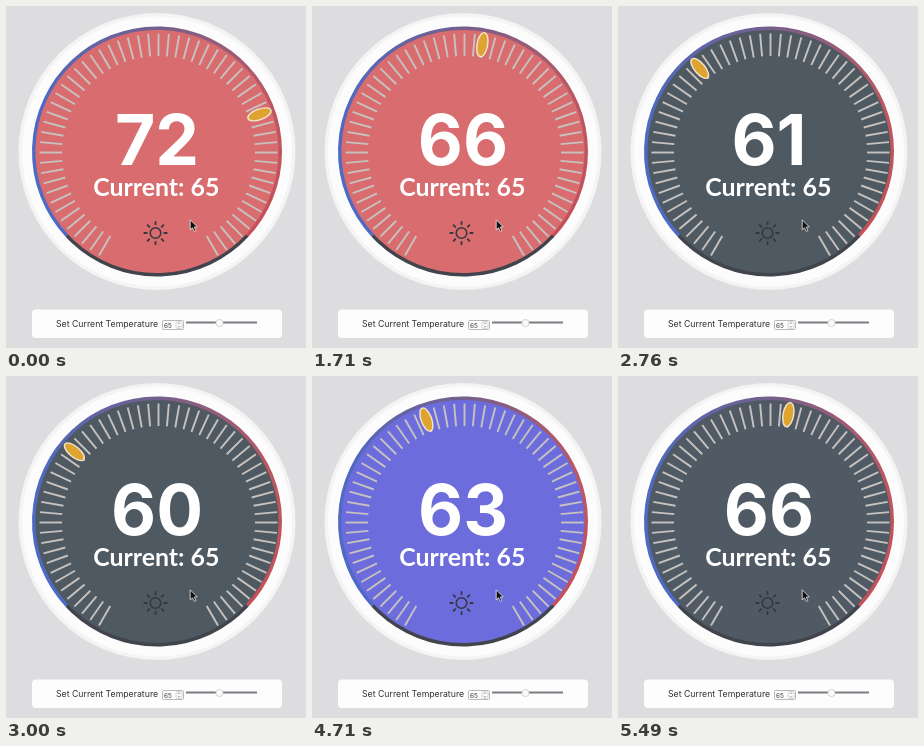
Recreate the animation shown at these times as an HTML page with a canvas. Size 300x342 px, loop 5520 ms.

```html
<!DOCTYPE html>
<html lang="en">
<head>
<meta charset="utf-8">
<title>Thermostat</title>
<style>
html, body { margin: 0; width: 100%; height: 100%; overflow: hidden; background: #dddddf; }
canvas { display: block; width: 300px; height: 342px; }
</style>
</head>
<body>
<canvas id="stage"></canvas>
<script>
const LOOP = 5520, CX = 151, CY = 145.5;
const canvas = document.getElementById('stage');
const ctx = canvas.getContext('2d');
const scale = window.devicePixelRatio || 1;
canvas.width = 300 * scale;
canvas.height = 342 * scale;

const RED = [217, 108, 111], SLATE = [79, 89, 97], BLUE = [108, 108, 220];
const FADE = 350;
// time, handle angle in degrees from the top
const path = [[0, 70], [300, 70], [1110, 40], [1980, -5], [2760, -40], [3300, -60],
  [3420, -60], [3630, -55], [4710, -20], [5490, 10], [5520, 10]];
const fades = [[1840, SLATE], [3000, BLUE], [5220, SLATE]];
const rad = deg => deg * Math.PI / 180;

function angleAt(t) {
  let i = 1;
  while (i < path.length - 1 && t > path[i][0]) i++;
  const [t0, a0] = path[i - 1], [t1, a1] = path[i];
  return Math.round((a0 + (a1 - a0) * (t - t0) / (t1 - t0)) / 5) * 5;
}

// cubic-bezier(.25, .1, .25, 1)
function ease(x) {
  if (x <= 0 || x >= 1) return x <= 0 ? 0 : 1;
  let lo = 0, hi = 1, u = 0.5;
  for (let i = 0; i < 20; i++) {
    u = (lo + hi) / 2;
    const bx = 0.75 * u * (1 - u) + u ** 3;
    if (bx < x) lo = u; else hi = u;
  }
  return 0.3 * u * (1 - u) ** 2 + 3 * u * u * (1 - u) + u ** 3;
}

function faceColor(t) {
  let c = RED;
  for (const [start, to] of fades) {
    const k = ease((t - start) / FADE);
    c = c.map((v, i) => v + (to[i] - v) * k);
  }
  return `rgb(${c.map(Math.round).join(',')})`;
}

function disc(x, y, r, fill) {
  ctx.beginPath();
  ctx.arc(x, y, r, 0, 7);
  ctx.fillStyle = fill;
  ctx.fill();
}

function line(x0, y0, x1, y1, color, width) {
  ctx.beginPath();
  ctx.moveTo(x0, y0);
  ctx.lineTo(x1, y1);
  ctx.strokeStyle = color;
  ctx.lineWidth = width;
  ctx.stroke();
}

function box(x, y, w, h, r) {
  ctx.beginPath();
  ctx.roundRect(x, y, w, h, r);
}

function text(s, x, y, font, color, align) {
  ctx.font = font;
  ctx.fillStyle = color;
  ctx.textAlign = align;
  ctx.fillText(s, x, y);
}

function spoke(deg, r0, r1, color, width) {
  const s = Math.sin(rad(deg)), c = -Math.cos(rad(deg));
  line(r0 * s, r0 * c, r1 * s, r1 * c, color, width);
}

function ring() {
  const g = ctx.createConicGradient(rad(135), CX, CY);
  g.addColorStop(0, '#4c6ac6');
  g.addColorStop(0.2, '#5069c0');
  g.addColorStop(0.375, '#745f8c');
  g.addColorStop(0.55, '#bb5862');
  g.addColorStop(0.75, '#c84e56');
  ctx.lineWidth = 3.4;
  ctx.strokeStyle = g;
  ctx.beginPath();
  ctx.arc(CX, CY, 123.3, rad(137), rad(403));
  ctx.stroke();
  ctx.strokeStyle = '#41444c';
  ctx.beginPath();
  ctx.arc(CX, CY, 123.3, rad(43), rad(137));
  ctx.stroke();
}

function ticks() {
  ctx.save();
  ctx.translate(CX + 1.5, CY + 1);
  for (let d = -150; d <= 150; d += 5) spoke(d, 96.5, 119, '#c6c2bf', 1.9);
  ctx.restore();
}

function sun() {
  const ink = '#36373c';
  ctx.save();
  ctx.translate(149.5, 227);
  ctx.lineCap = 'round';
  ctx.strokeStyle = ink;
  ctx.lineWidth = 1.6;
  ctx.beginPath();
  ctx.arc(0, 0, 5.3, 0, 7);
  ctx.stroke();
  for (let d = 0; d < 360; d += 45) spoke(d, 8.8, 11.2, ink, 1.8);
  ctx.restore();
}

function handle(deg) {
  ctx.save();
  ctx.translate(CX + 0.5, CY);
  ctx.rotate(rad(deg));
  ctx.beginPath();
  ctx.ellipse(0, -108.5, 5.3, 12.2, 0, 0, 7);
  ctx.fillStyle = '#dfa42f';
  ctx.fill();
  ctx.strokeStyle = '#f0e6d2';
  ctx.lineWidth = 1.4;
  ctx.stroke();
  ctx.restore();
}

function panel() {
  box(26, 303.5, 250, 28.5, 4);
  ctx.fillStyle = '#fdfdfd';
  ctx.fill();
  text('Set Current Temperature', 50, 320.7, '8.72px Inter, sans-serif', '#2e3036', 'left');

  box(156.5, 314.5, 21, 9, 1);
  ctx.strokeStyle = '#b9b9bc';
  ctx.lineWidth = 1;
  ctx.stroke();
  text('65', 158, 321.7, '6.5px Inter, sans-serif', '#3a3a3e', 'left');
  box(170, 315.5, 6, 7, 1.5);
  ctx.lineWidth = 0.6;
  ctx.stroke();
  for (const d of [-1, 1]) {
    ctx.beginPath();
    ctx.moveTo(171.7, 319 + d);
    ctx.lineTo(173, 319 + 2.3 * d);
    ctx.lineTo(174.3, 319 + d);
    ctx.strokeStyle = '#66666a';
    ctx.stroke();
  }

  line(180, 316.5, 251, 316.5, '#7b7d82', 2);
  disc(213.5, 317, 3.6, '#fafafa');
  ctx.strokeStyle = '#c4c4c8';
  ctx.lineWidth = 0.7;
  ctx.stroke();
}

function cursor() {
  ctx.save();
  ctx.translate(184.2, 213.8);
  ctx.beginPath();
  ctx.moveTo(0, 0);
  for (const [x, y] of [[0, 10], [2.3, 8], [4, 11.6], [5.7, 10.8], [4.1, 7.3], [7, 7]]) ctx.lineTo(x, y);
  ctx.closePath();
  ctx.fillStyle = '#111';
  ctx.fill();
  ctx.strokeStyle = '#eee';
  ctx.lineWidth = 0.8;
  ctx.stroke();
  ctx.restore();
}

function draw(t) {
  const deg = angleAt(t);
  ctx.setTransform(scale, 0, 0, scale, 0, 0);
  ctx.fillStyle = '#dddddf';
  ctx.fillRect(0, 0, 300, 342);

  disc(CX, CY, 138.5, '#f4f4f5');
  disc(CX, CY, 135, '#fcfcfc');
  disc(CX, CY, 124, faceColor(t));
  ring();
  ticks();
  handle(deg);

  text(Math.floor(65 + deg / 10), CX, 159.3, '700 69.5px Inter, sans-serif', '#fff', 'center');
  text('Current: 65', CX - 0.7, 189.7, '700 24.9px Lato, sans-serif', '#fff', 'center');
  sun();
  cursor();
  panel();
}

const start = performance.now();
function tick() {
  draw(Math.max(0, performance.now() - start) % LOOP);
  requestAnimationFrame(tick);
}
tick();
</script>
</body>
</html>
```
